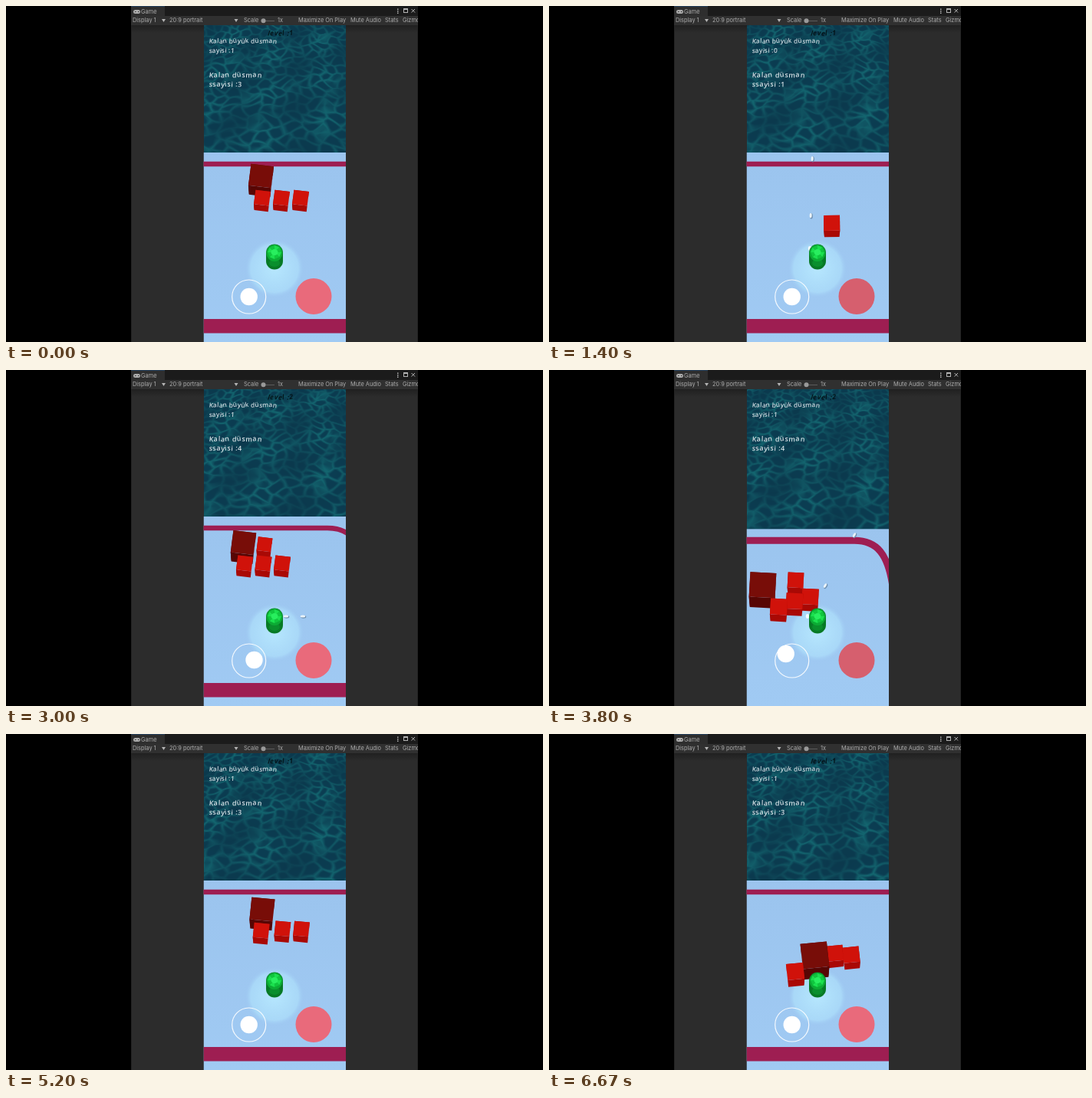
An HTML page with a canvas for the animation above (6.74 s loop, 700 by 438 pixels).

```html
<!DOCTYPE html>
<html lang="tr">
<head>
<meta charset="utf-8">
<title>Game</title>
<style>
html, body { margin: 0; width: 100%; height: 100%; overflow: hidden; background: #000; }
canvas { display: block; width: 700px; height: 438px; }
</style>
</head>
<body>
<canvas id="stage" width="700" height="438"></canvas>
<script>
const LOOP = 6740, STEP = 200 / 3;
const WIN = 1733, LEVEL2 = 2533, RESTART = 5030;
const VIEW = { x: 257.5, y: 25, w: 185.5, h: 413 };
const PLAYER = { x: 350, y: 327 };
const UI_FONT = 'Inter, "Open Sans", sans-serif';
const HAND_FONT = '"Open Sans", Lato, sans-serif';
const g = document.getElementById('stage').getContext('2d');

const clamp = (v, lo, hi) => Math.min(hi, Math.max(lo, v));

// Smooth 0 to 1 between two times
function ramp(t, from, to) {
  const k = clamp((t - from) / (to - from), 0, 1);
  return k * k * (3 - 2 * k);
}

function rect(x, y, w, h, fill) {
  g.fillStyle = fill;
  g.fillRect(x, y, w, h);
}

function poly(points, fill) {
  g.fillStyle = fill;
  g.beginPath();
  points.forEach(([x, y]) => g.lineTo(x, y));
  g.closePath();
  g.fill();
}

function oval(x, y, rx, ry, fill, turn = 0) {
  g.fillStyle = fill;
  g.beginPath();
  g.ellipse(x, y, rx, ry, turn, 0, 7);
  g.fill();
}

function label(text, x, y) {
  g.font = `7.4px ${UI_FONT}`;
  g.fillStyle = '#acacac';
  g.fillText(text, x, y);
}

// Lettering with a slightly uneven, hand-drawn baseline
function handText(text, x, y, size, fill, gap = 0, style = '600') {
  g.font = `${style} ${size}px ${HAND_FONT}`;
  g.fillStyle = fill;
  [...text].forEach((ch, i) => {
    g.save();
    g.translate(x, y + Math.sin(i * 2.3) * size * 0.04);
    g.rotate(Math.sin(i * 4.1 + 1) * 0.12);
    g.fillText(ch, 0, 0);
    g.restore();
    x += g.measureText(ch).width + gap;
  });
}

function drawEditor() {
  rect(0, 0, 700, 438, '#000');
  rect(163, 0, 374, 438, '#2c2c2c');
  rect(163, 0, 374, 13, '#1b1b1b');
  rect(163, 1, 44, 12, '#2e2e2e');
  rect(163, 0, 44, 1, '#25405c');
  rect(163, 13, 374, 12, '#303030');
  const shade = g.createLinearGradient(0, 25, 0, 35);
  shade.addColorStop(0, '#202020');
  shade.addColorStop(1, '#2c2c2c');
  rect(163, 25, 374, 10, shade);
  [163, 536].forEach(x => rect(x, 25, 1, 413, '#242424'));

  g.fillStyle = '#acacac';
  g.beginPath();
  g.roundRect(166, 5, 9, 5, 2.5);
  g.fill();
  [168, 172].forEach(x => rect(x, 7, 1.5, 1, '#303030'));
  label('Game', 176, 10);

  g.save();
  g.beginPath();
  g.rect(163, 0, 374, 30);
  g.clip();
  [['Display 1', 165], ['20:9 portrait', 213], ['Scale', 310], ['1x', 354], ['Maximize On Play', 381],
   ['Mute Audio', 449], ['Stats', 494], ['Gizmos', 517]].forEach(([text, x]) => label(text, x, 21.3));
  g.restore();
  [205.5, 300].forEach(x => poly([[x - 2.5, 17], [x + 2.5, 17], [x, 21]], '#b4b4b4'));
  rect(335, 19, 15, 1, '#5c5c5c');
  oval(335.5, 19.3, 3, 3, '#999');

  for (let y = 3.5; y < 9; y += 2.5) rect(510, y, 1.5, 1.5, '#b4b4b4');
  g.strokeStyle = '#b4b4b4';
  g.lineWidth = 1;
  g.strokeRect(518.5, 3.5, 5, 5);
  rect(518, 3, 6, 2, '#b4b4b4');
  g.beginPath();
  g.moveTo(528.5, 4); g.lineTo(533, 8.5);
  g.moveTo(533, 4); g.lineTo(528.5, 8.5);
  g.stroke();
}

const GRID = 32;
const scatter = Array.from({ length: GRID * GRID * 2 }, (_, i) => {
  const s = Math.sin(i * 127.1 + 31.7) * 43758.5453;
  return s - Math.floor(s);
});
const waterCanvas = document.createElement('canvas');
waterCanvas.width = 186;
waterCanvas.height = 200;
const waterCtx = waterCanvas.getContext('2d');
const waterImage = waterCtx.createImageData(186, 200);

// Brightness of the cell borders that make up the ripples
function ripple(u, v) {
  const iu = Math.floor(u), iv = Math.floor(v);
  let near = 9, next = 9;
  for (let a = iu - 1; a <= iu + 1; a++) {
    for (let b = iv - 1; b <= iv + 1; b++) {
      const k = ((a & 31) * GRID + (b & 31)) * 2;
      const d = Math.hypot(a + scatter[k] - u, b + scatter[k + 1] - v);
      if (d < near) { next = near; near = d; } else if (d < next) next = d;
    }
  }
  return Math.max(0, 1 - (next - near) / 0.4);
}

function drawWater(t, shift) {
  const height = Math.ceil(166 + shift), px = waterImage.data;
  for (let y = 0, i = 0; y < height; y++) {
    const size = 11 + (y - shift) * 0.05;
    const v = Math.log(size / 11) / 0.05 / 0.7 + t * 0.0003 + 40;
    for (let x = 0; x < 186; x++, i += 4) {
      const u = (x - 92) / size + 16;
      const line = ripple(u + Math.sin(v * 2.1) * 0.2, v + Math.sin(u * 2.6 + t * 0.0006) * 0.2);
      const patch = 0.6 + 0.4 * Math.sin(u * 0.9 + v * 0.7) * Math.sin(v * 0.6 - u * 0.4);
      const glow = line * patch;
      px[i] = 11 + 9 * glow;
      px[i + 1] = 56 + 44 * glow + 5 * patch;
      px[i + 2] = 76 + 32 * glow + 6 * patch;
      px[i + 3] = 255;
    }
  }
  waterCtx.putImageData(waterImage, 0, 0);
  g.drawImage(waterCanvas, 0, 0, 186, height, VIEW.x, VIEW.y, 186, height);
}

function drawFloor(shift, bend) {
  const top = 191 + shift, y = top + 15;
  const floor = g.createLinearGradient(0, 190, 0, 438);
  floor.addColorStop(0, '#9bc4ee');
  floor.addColorStop(1, '#a0caf3');
  rect(VIEW.x, top, VIEW.w, 260, floor);

  g.strokeStyle = '#9e1e52';
  g.lineWidth = 6.5 + shift * 0.15;
  g.beginPath();
  g.moveTo(250, y);
  g.lineTo(bend, y);
  g.bezierCurveTo(bend + 30, y, bend + 44, y + 18, bend + 50, y + 60);
  g.stroke();
  rect(VIEW.x, 408 + shift * 1.9, VIEW.w, 18.5, '#9e1e52');
}

function drawCube({ x, y, turn, big }) {
  const size = big ? 30 + (y - 231) * 0.07 : 19.7 + (y - 254) * 0.04;
  const drop = size * 0.4, h = size / 2;
  const a = turn * Math.PI / 180, cos = Math.cos(a), sin = Math.sin(a);
  const top = [[-1, -1], [1, -1], [1, 1], [-1, 1]].map(([p, q]) =>
    [x + (p * cos - q * sin) * h, y - drop / 2 + (p * sin + q * cos) * h * 0.95]);
  const base = top.map(([p, q]) => [x + (p - x) * 0.93 - sin * 2, q + drop]);
  top.forEach((corner, i) => {
    const j = (i + 1) % 4;
    poly([corner, top[j], base[j], base[i]], big ? '#570604' : '#a90905');
  });
  poly(top, big ? '#780d08' : '#d0120a');
}

function drawGlow() {
  const light = g.createRadialGradient(350, 342, 4, 350, 342, 38);
  light.addColorStop(0, 'rgba(184,234,255,.85)');
  light.addColorStop(0.8, 'rgba(176,227,252,.6)');
  light.addColorStop(1, 'rgba(160,204,244,0)');
  oval(350, 342, 38, 38, light);
}

function drawPlayer() {
  const { x, y } = PLAYER;
  g.save();
  g.beginPath();
  g.roundRect(x - 11, y - 16.5, 22, 33, 11);
  g.clip();
  rect(x - 12, y - 17, 24, 35, '#077a25');
  oval(x, y + 8, 7, 5, '#0a8f2d');
  oval(x, y - 5, 10.5, 11, '#0cab34');
  for (let i = 0; i < 8; i++) {
    const rim = k => [x + 9 * Math.cos(k * Math.PI / 4), y - 6 + 9 * Math.sin(k * Math.PI / 4)];
    poly([[x, y - 6], rim(i), rim(i + 1)], i % 2 ? '#10c63e' : '#1be04e');
  }
  oval(x, y - 6, 4.5, 4, '#28ee5e');
  g.restore();
}

const SHOT_GAP = 200, SHOT_LIFE = 340;
const VOLLEYS = [
  { from: 484, to: 1650, x: 340, y: 316, vx: 0.01, vy: -0.37 },
  { from: 2755, to: 2980, x: 360, y: 321, vx: 0.11, vy: 0 },
  { from: 3479, to: 4279, x: 337, y: 321, vx: 0.19, vy: -0.33 }
];
const firing = (volley, t) => t > volley.from && t < volley.to;

function drawShots(t) {
  for (const s of VOLLEYS) {
    const turn = Math.atan2(s.vy, s.vx);
    for (let born = s.from; born <= s.to; born += SHOT_GAP) {
      const age = t - born;
      if (age < 0 || age > SHOT_LIFE) continue;
      const x = s.x + s.vx * age, y = s.y + s.vy * age;
      oval(x + 0.8, y + 0.8, 3.6, 1.9, '#6f8fae', turn);
      oval(x, y, 3.2, 1.5, '#eaf3f9', turn);
    }
    if (firing(s, t)) oval(s.x, s.y, 2.2, 3, '#f4fbff');
  }
}

// A cube starts at x, y and has drifted by dx, dy when its level's progress is 1
const cube = (x, y, dx, dy, big = false) => ({ x, y, dx, dy, big });
// Listed in the order in which they are shot
const FIRST = [cube(334, 254, -13, 60), cube(332.5, 227.5, 14, 68, true),
  cube(359, 254, 14, 36), cube(384, 254, 10, 38)];
const SECOND = [cube(309.5, 231, -31, 56, true), cube(337, 231, -15.5, 47)];
for (let i = 0; i < 3; i++) {
  SECOND.push(cube(311 + 24.5 * i, 256, -11.5 - 4 * i, 57 / (1 + 0.15 * i)));
}

const drifted = (c, k, spin) =>
  ({ big: c.big, x: c.x + c.dx * k, y: c.y + c.dy * k, turn: 7 - spin * k });

// Under fire the cubes head straight for the player
function chasing(c, k) {
  const reach = c.big ? 0.69 : 0.53;
  return drifted({ ...c, dx: (PLAYER.x - c.x) * reach, dy: (PLAYER.y - c.y) * reach }, k, 9);
}

function liveCubes(t) {
  if (t >= RESTART) return FIRST.map(c => drifted(c, (t - RESTART) / 1640, 13));
  if (t >= LEVEL2) return SECOND.map(c => drifted(c, clamp((t - 3000) / 800, -0.3, 1.3), 4));
  return FIRST.filter((_, i) => t < 620 + 340 * i).map(c => chasing(c, t / 1640));
}

function drawHud(t, level, cubes) {
  const bigs = cubes.filter(c => c.big).length;
  handText(`level :${level}`, 341, 38.5, 9, '#04161c', 0.5, 'italic bold');
  handText('Kalan büyük düsman', 264.5, 48.5, 8.4, '#cbd8de', 0.2);
  handText(`sayisi :${bigs}`, 264.5, 61, 8.4, '#cbd8de', 0.2);
  handText('Kalan düsman', 264.5, 93, 9, '#d6e1e6', 0.6);
  handText(`ssayisi :${cubes.length - bigs}`, 264.5, 105, 9, '#d6e1e6', 0.5);

  g.strokeStyle = 'rgba(255,255,255,.9)';
  g.lineWidth = 1.2;
  g.beginPath();
  g.arc(316.7, 379, 22, 0, 7);
  g.stroke();
  const turned = ramp(t, 3150, 3350);
  const right = ramp(t, 2600, 2750) - turned, upLeft = turned - ramp(t, 4280, 4400);
  oval(316.7 + 6.8 * right - 8 * upLeft, 379 - right - 9 * upLeft, 11.2, 11.2, '#fff');
  oval(401, 378.5, 23.5, 23.5, VOLLEYS.some(v => firing(v, t)) ? '#d65f6e' : '#e96a7b');
}

function drawWin() {
  rect(VIEW.x, VIEW.y, VIEW.w, VIEW.h, 'rgba(138,255,26,.6)');
  handText('CONGRATULATIONS', 283, 185.8, 13, '#0a1c04', 0.1);
  rect(321, 211, 58.5, 36, '#86fb1e');
  g.strokeStyle = '#62bd2a';
  g.lineWidth = 1;
  g.strokeRect(321.5, 211.5, 57.5, 35);
  handText('LOAD NEXT', 332, 228, 6, '#d4ffb0', 0.15);
  handText('LEVEL', 341, 236, 6, '#d4ffb0', 0.1);
}

function draw(t) {
  const won = t >= WIN && t < LEVEL2;
  const second = t >= LEVEL2 && t < RESTART;
  const shift = second ? 28 * ramp(t, 3300, 4200) : 0;
  const bend = second ? 440 - 42 * ramp(t, 2700, 3300) : 448;
  drawEditor();
  g.save();
  g.beginPath();
  g.rect(VIEW.x, VIEW.y, VIEW.w, VIEW.h);
  g.clip();
  drawWater(t, shift);
  drawFloor(shift, bend);
  if (won) {
    drawWin();
  } else {
    const cubes = liveCubes(t);
    const front = c => c.y + (c.big ? 6 : 0);
    drawGlow();
    [...cubes].sort((a, b) => front(a) - front(b)).forEach(drawCube);
    drawShots(t);
    drawPlayer();
    drawHud(t, second ? 2 : 1, cubes);
  }
  g.restore();
}

let shown = -1;
function tick() {
  const step = Math.floor((performance.now() % LOOP) / STEP + 0.05);
  if (step !== shown) {
    shown = step;
    draw(step * STEP);
  }
  requestAnimationFrame(tick);
}
tick();
</script>
</body>
</html>
```
